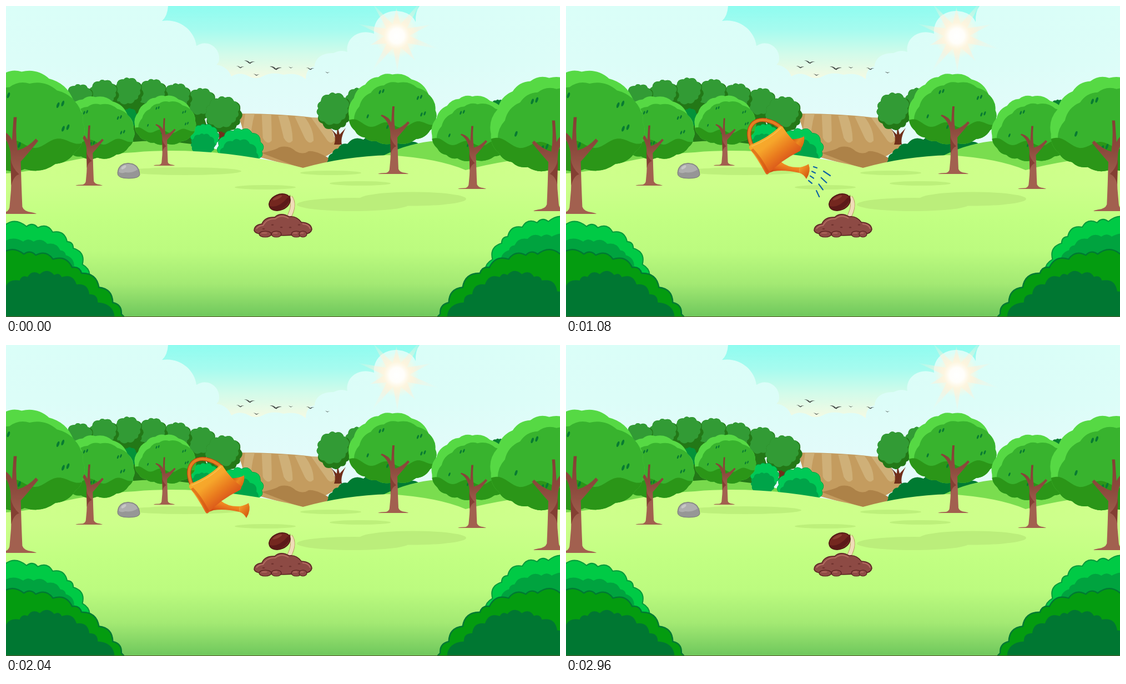
Animation of 998 by 561 pixels, one loop 3 s. Source, as an HTML page with a canvas:

```html
<!DOCTYPE html>
<html lang="en">
<head>
<meta charset="utf-8">
<title>Watering a seedling</title>
<style>
html, body { margin: 0; width: 100%; height: 100%; overflow: hidden; }
canvas { display: block; }
</style>
</head>
<body>
<canvas id="stage" width="998" height="561"></canvas>
<script>
const ctx = document.getElementById('stage').getContext('2d');
const { sin, cos, PI } = Math;
const TAU = PI * 2;
const BARK = '#a2604f', DARK_BARK = '#843f33', DARK_LEAF = '#007a33', SOIL_EDGE = '#57201f';

function fill(shape, color, line, width = 1) {
  const path = typeof shape === 'string' ? new Path2D(shape) : shape;
  if (color) { ctx.fillStyle = color; ctx.fill(path); }
  if (line) { ctx.strokeStyle = line; ctx.lineWidth = width; ctx.stroke(path); }
}

function stroke(d, color, width) { fill(d, null, color, width); }

function oval(x, y, rx, ry, color, turn = 0, line, width) {
  const path = new Path2D();
  path.ellipse(x, y, rx, ry, turn, 0, TAU);
  fill(path, color, line, width);
}

function within(draw) { ctx.save(); draw(); ctx.restore(); }

function shade(x0, y0, x1, y1, ...colors) {
  const g = ctx.createLinearGradient(x0, y0, x1, y1);
  colors.forEach((c, i) => g.addColorStop(i / (colors.length - 1), c));
  return g;
}

function glow(radius, ...stops) {
  const g = ctx.createRadialGradient(0, 0, 0, 0, 0, radius);
  stops.forEach(([at, color]) => g.addColorStop(at, color));
  return g;
}

// Closed outline of clockwise points whose edges bulge outwards
function lobes(pts, bulge) {
  const path = new Path2D();
  path.moveTo(...pts[0]);
  pts.forEach(([x, y], i) => {
    const [u, v] = pts[(i + 1) % pts.length];
    path.quadraticCurveTo((x + u) / 2 + (v - y) * bulge * 2, (y + v) / 2 - (u - x) * bulge * 2, u, v);
  });
  return path;
}

// Scalloped oval; sag lowers its widest part
function ring(x, y, rx, ry, n = 12, bulge = 0.25, sag = 0) {
  const pts = Array.from({ length: n }, (_, i) => {
    const a = (i + 0.22 * sin(i * 5)) / n * TAU - 1.9;
    return [x + cos(a) * rx * 0.93, y + ry * (sin(a) * 0.93 + sag * cos(a) ** 2)];
  });
  return lobes(pts, bulge);
}

// Scalloped slope along a quadratic curve, closed at the lower left
function hedge([x0, y0], [cx, cy], [x1, y1], n, bulge) {
  const pts = [];
  for (let i = 0; i <= n; i++) {
    const t = (i + 0.2 * sin(i * 4)) / n, s = 1 - t;
    pts.push([s * s * x0 + 2 * s * t * cx + t * t * x1, s * s * y0 + 2 * s * t * cy + t * t * y1]);
  }
  return lobes([...pts, [x1, 600], [x0, 600]], bulge);
}

function sky() {
  ctx.fillStyle = shade(0, 0, 0, 130, '#8ffcf0', '#a6fbef', '#d2fbea', '#f4fae3');
  ctx.fillRect(0, 0, 998, 300);
  fill('M0 0H292Q291 18 281 27C312 22 340 44 343 72C362 59 386 74 384 97Q383 103 379 106' +
    'C392 107 402 116 406 127Q420 118 436 126Q450 134 462 127Q480 118 500 124Q525 119 540 132' +
    'C540 118 548 109 556 109C556 96 568 84 590 85Q603 78 615 83C611 60 634 40 663 50' +
    'C661 25 680 9 702 9C720 9 734 18 738 29Q737 10 745 0H998V300H0Z',
    shade(0, 0, 0, 200, '#dafef8', '#dcfdf8', '#e3fbfa'));
}

function sun(pulse) {
  within(() => {
    ctx.translate(704, 54);
    ctx.scale(1 + pulse * 0.27, 1 + pulse * 0.27);
    const star = new Path2D();
    for (let i = 0; i < 20; i++) {
      const r = i % 2 ? 22 : 66 + 16 * cos(i * 2), a = i / 20 * TAU + 0.3;
      star.lineTo(cos(a) * r, sin(a) * r);
    }
    fill(star, glow(80, [0, '#fff5e0'], [0.35, 'rgba(255,238,214,.75)'],
      [0.6, 'rgba(255,240,218,.4)'], [1, 'rgba(255,242,222,0)']));
    oval(0, 0, 40, 40, glow(40, [0, '#fff'], [0.33, '#fffefa'],
      [0.6, 'rgba(255,246,222,.75)'], [1, 'rgba(255,246,222,0)']));
  });
}

const birds = [[439, 101, 1], [422, 110, .7], [451, 124, .55], [486, 112, 1.1],
  [513, 111, .42], [548, 113, .72], [579, 120, .42]];

function flock(pulse) {
  for (const [x, y, s] of birds) within(() => {
    ctx.translate(x, y);
    ctx.scale(s, s * (0.9 - pulse * 0.2));
    fill('M-10-3Q-4-4 0 1Q4-2 10-1Q4 0 1 3.5Q-2 3-4 0Q-6-2-10-3Z', '#444b47');
  });
}

function field() {
  fill('M418 194Q500 194 568 203L605 255L535 294L440 268Z', '#c49c5f');
  for (let i = 0; i < 5; i++) {
    const x = 431 + 29.7 * i, top = 194 + 1.8 * i, foot = x + (i - 1) * 8 + 10;
    fill(`M${x} ${top}H${x + 17}Q${foot + 8} 220 ${foot + 8} 243Q${foot} 252 ${foot - 8} 238Z`, '#cfb078');
  }
  fill('M460 265Q485 260 492 255Q509 250 522 262Q535 269 545 262Q560 260 590 280L535 294Z', '#ad8248');
}

function backTree(x, y, rx, ry) {
  const crown = ring(x, y, rx, ry);
  fill(crown, '#237817');
  within(() => {
    ctx.clip(crown);
    fill(ring(x - rx * 0.14, y - ry * 0.28, rx, ry, 13), '#329b35');
  });
}

function smallTrunk(x, y) {
  fill(`M${x - 6} ${y}q6-15-7-30l12 12l1-16l4 16l11-12q-10 18-7 30Z`, '#702f1b');
}

// Lean sideways about a ground line
function sway(base, lean, draw) {
  within(() => { ctx.transform(1, 0, -lean, 1, lean * base, 0); draw(); });
}

function backdrop(pulse) {
  const lean = pulse * 0.05;
  sway(230, lean, () => {
    fill('M116 166H345L375 255H116Z', '#237817');
    for (let i = 5; i >= 0; i--) backTree(132 + 44 * i, 169 - 12 * sin(i * 0.75), 27, 28);
    fill(ring(223, 202, 14, 18, 9), '#03933a');
    smallTrunk(388, 244);
    backTree(392, 196, 33, 33);
  });
  sway(240, -lean, () => {
    backTree(634, 175, 23, 28);
    smallTrunk(597, 250);
    backTree(591, 190, 31, 34);
  });
  fill('M0 245H230Q310 238 400 264V310H0Z', '#78d94d');
  for (const [x, y, r] of [[358, 236, 26], [422, 258, 42]]) {
    fill(ring(x, y, r, r * 0.88, 13), '#00c956', '#00a244');
    fill(ring(x - 3, y + 14, r * 0.85, r * 0.76, 12), '#00a449');
  }
  fill(ring(675, 285, 103, 50, 22, 0.2), '#007b32');
  fill('M670 275Q715 250 765 244H998V300H680Z', '#7add4f');
  fill(ring(887, 181, 14, 12), '#078132');
}

function ground() {
  fill('M0 302Q40 299 62 292Q150 268 232 264Q310 257 400 267Q480 277 535 292Q610 271 690 269' +
    'Q780 275 828 296Q900 276 998 270V561H0Z',
    shade(0, 262, 0, 561, '#ceff8a', '#cdff8b', '#c2ff82', '#bcfb7f', '#a3e973', '#6ec75c'));
  for (const [x, y, rx, ry] of [[322, 298, 102, 7], [585, 301, 55, 4], [638, 320, 55, 4], [467, 327, 55, 4]])
    oval(x, y, rx, ry, '#bdf07b');
  const wide = new Path2D();
  wide.ellipse(733, 348, 96, 12.5, 0, 0, TAU);
  wide.ellipse(625, 358, 101, 12, 0, 0, TAU);
  fill(wide, '#bbee7b');
}

function crownAt(dx, dy) { return ring(dx - 3, dy - 118, 84, 66, 15, 0.13, 0.18); }

function crown() {
  const outline = crownAt(0, 0);
  fill(outline, '#56d944');
  ctx.clip(outline);
  fill(crownAt(10, 15), '#38b32e');
  const dusk = new Path2D();
  for (let x = -110; x <= 110; x += 4) dusk.lineTo(x, -88 - x * x / 900 + 5 * sin(x / 9));
  dusk.lineTo(110, 0);
  dusk.lineTo(-110, 0);
  fill(dusk, '#2b9618');
  for (let i = 0; i < 9; i++) {
    const a = (i >> 1) * 2.4 - 0.6;
    oval(cos(a) * 52 + i % 2 * 6, sin(a) * 34 - 118 - i % 2 * 2, 1.6, 3.8, '#087b32', 0.35);
  }
}

function tree(x, base, s, shift = 0, mirror = 1) {
  within(() => {
    ctx.translate(x, base);
    ctx.scale(s, s);
    within(() => { ctx.translate(shift, 0); crown(); });
    ctx.scale(mirror, 1);
    const bark = shade(0, -122, 0, 0, DARK_BARK, '#8c4a3d', BARK, BARK);
    fill('M-29 0Q-26-2-14-2Q-8-4-8-10Q-4-45-7-78Q-11-98-24-105L-22-107Q-9-103-5-93L-3-122H1' +
      'Q-1-100 2-80Q15-84 25-95L28-92Q15-76 6-66Q7-30 8-9Q10-3 20-2Q25-1 26 0Z', bark);
    fill('M-7-70Q-5-58 4-50Q-3-48-6-36Z', DARK_BARK);
  });
}

function rock() {
  fill('M201 301Q202 284 220 283.5Q240 284 241 304Q240 311 221 311Q200 311 201 301Z', '#969696', '#777');
  fill('M203 299Q205 286 220 285Q233 285 237 295Q228 302 215 300Q207 303 203 299Z', '#aeaeae');
  oval(212, 291, 5, 2.5, '#c6c6c6', -0.6);
}

function seedling() {
  const stem = 'M509 382Q522 358 512 345';
  stroke(stem, '#b9935f', 8.5);
  stroke(stem, '#f0dcb8', 6.8);
  oval(493, 354, 20, 14, '#74271f', -0.42, '#4a1412', 1.5);
  fill('M475 361Q491 365 506 347Q513 342 511 339Q516 351 501 363Q483 375 475 361Z', '#5c1a18');
  oval(489, 346, 9, 2.5, '#8c3e32', -0.45);
  fill('M447 405Q447 395 461 393Q466 380 484 381Q495 371 510 380Q523 378 532 390Q550 391 551 403' +
    'Q549 411 538 411Q500 417 460 411Q449 411 447 405Z', '#8d4a44', SOIL_EDGE, 1.5);
  stroke('M451 402Q455 396 463 396Q470 383 485 384Q496 375 509 383M534 393Q546 394 548 402', '#b46c61', 1.8);
  for (const [x, r] of [[467, 11], [487, 9], [523, 9], [535, 7]]) {
    oval(x, 411.5, r, 5.5, '#8f4b45', 0, SOIL_EDGE, 1.2);
    oval(x - 2, 409.5, r * 0.5, 1.3, '#ad665c');
  }
  for (let i = 0; i < 5; i++) oval(464 + i * 16, 398 + 4 * cos(i * 2.5), 2.3, 1.2, '#70332f');
}

function bush(backX, backY) {
  within(() => {
    ctx.translate(backX, backY);
    fill(hedge([-40, 408], [118, 366], [146, 494], 8, 0.24), '#00ca45', '#00993b', 2);
    fill(hedge([-40, 440], [106, 392], [130, 494], 8, 0.2), '#00a33f');
  });
  fill(hedge([-40, 456], [115, 416], [212, 562], 9, 0.22), '#049c10', DARK_LEAF, 2.5);
  fill(hedge([-20, 532], [80, 420], [192, 566], 10, 0.26), '#007732');
}

function wateringCan() {
  const handle = 'M336 255C320 220 338 202 360 206Q376 209 388 220';
  ctx.lineCap = 'round';
  stroke(handle, '#b9480f', 7.5);
  stroke(handle, '#e67e22', 5);
  fill('M402 240Q420 241 429 235Q431 246 423 258L417 264Z', shade(405, 240, 428, 255, '#c9520f', '#ec8a20', '#d4600f'));
  fill('M360 303L387 281Q400 292 421 291L420 301Q394 295 374 298Z',
    shade(385, 284, 380, 303, '#f08a20', '#e2651a', '#c8440f'));
  fill('M421 291Q431 289 437 285Q442 298 433 312Q428 303 420 301Z', shade(420, 290, 438, 305, '#f6a02a', '#d4590f'));
  fill('M330 257Q329 253 333 250Q365 237 384 218Q388 215 391 219Q405 241 424 255Q425 260 419 263' +
    'Q388 278 364 303Q361 305 359 301Q345 275 330 257Z',
    shade(350, 232, 392, 286, '#f8ad2c', '#f6a62b', '#ea7c1e', '#d9541a'));
  fill('M333 260Q347 274 362 301L366 299Q352 272 337 257Z', 'rgba(205,75,15,.5)');
  stroke('M335 253Q366 241 387 220', '#fbc14c', 1.5);
}

function drops(far) {
  let d = '';
  for (let i = 0; i < 4; i++) d += far
    ? `M${464 - 4.3 * i} ${298 + 11.7 * i}l${12 - 2.3 * i} ${8 + i}`
    : `M${446 - 3 * i} ${290 + 8.3 * i}l6 ${2 + i}`;
  stroke(d, '#0b62a5', 2.2);
}

function ramp(t, from, length) { return Math.min(1, Math.max(0, (t - from) / length)); }

function watering(t) {
  const shown = ramp(t, 120, 160) * (1 - ramp(t, 2220, 160));
  if (!shown) return;
  within(() => {
    ctx.globalAlpha = shown;
    wateringCan();
    if (t >= 360 && t < 1840) drops(false);
    if (t >= 520 && t < 1840) drops(true);
  });
}

function draw(now) {
  const t = now % 3000;
  const pulse = (1 - cos(t / 1000 * TAU)) / 2;
  sky();
  sun(pulse);
  flock(pulse);
  field();
  backdrop(pulse);
  ground();
  tree(286, 288, 0.7, 4);
  tree(151, 324, 0.89, 14);
  tree(18, 375, 1.43, 10);
  tree(699, 303, 1);
  tree(841, 330, 0.93, 2);
  tree(985, 370, 1.34, -2, -1);
  rock();
  seedling();
  bush(0, 0);
  within(() => {
    ctx.translate(990, 0);
    ctx.scale(-1, 1);
    bush(-24, -9);
  });
  watering(t);
  ctx.fillStyle = '#5c552c';
  ctx.fillRect(0, 560, 998, 1);
  requestAnimationFrame(draw);
}
requestAnimationFrame(draw);
</script>
</body>
</html>
```
